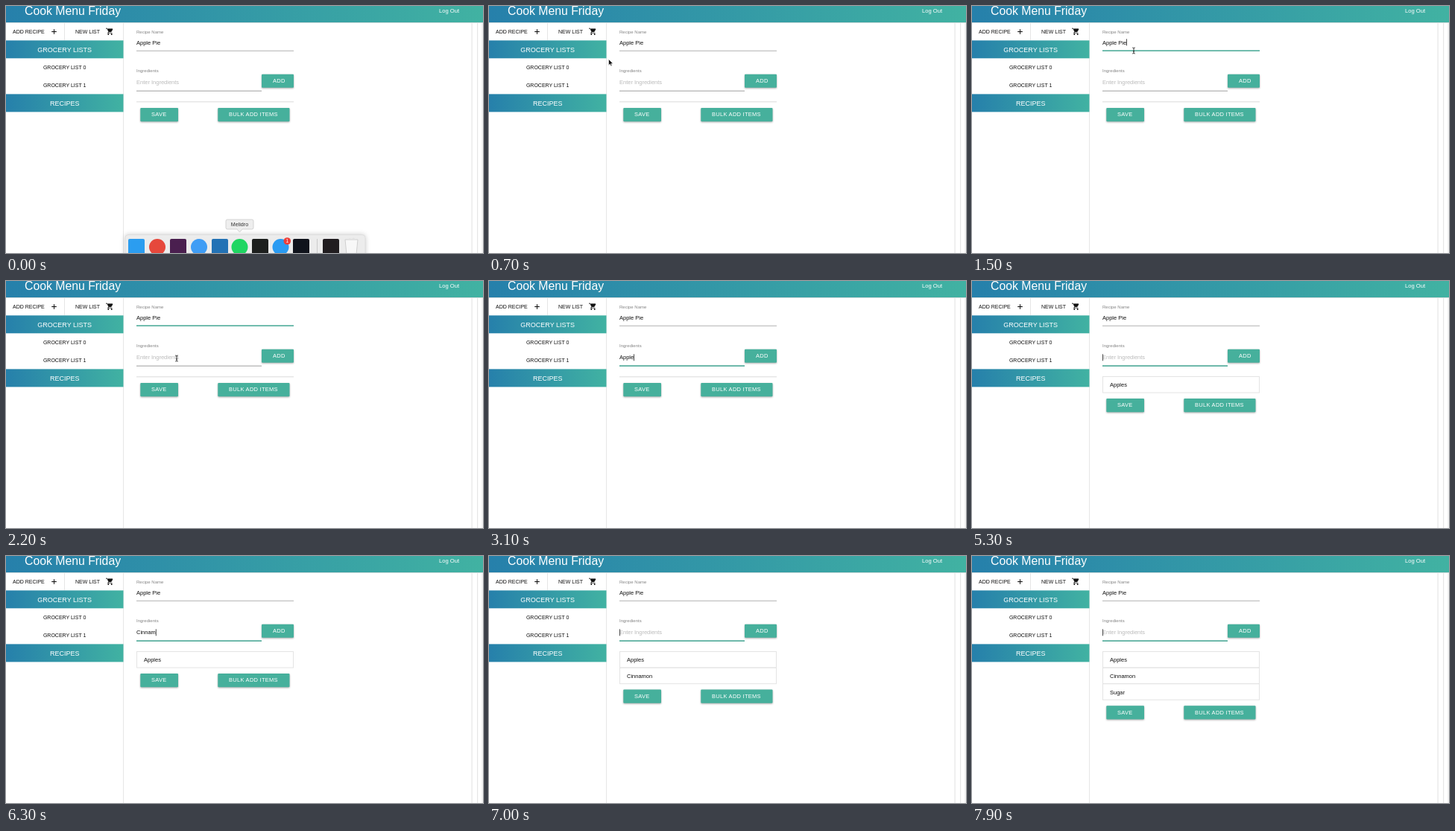
These frames come from a looping animation (640x332 px, 8 s). An HTML page:

```html
<!DOCTYPE html>
<html lang="en">
<head>
<meta charset="utf-8">
<title>Recipe form</title>
<style>
html, body { margin: 0; width: 100%; height: 100%; overflow: hidden; background: #fff; }
svg { display: block; width: 100vw; height: 100vh; }
text { font: 7.5px "Liberation Sans", Arial, sans-serif; fill: #111; white-space: pre; }
.title { font-size: 15.8px; fill: #fff; }
.logout { font-size: 7.6px; fill: #fff; }
.menu { font-size: 7px; }
.bar { font-size: 9px; fill: #fff; }
.mid { text-anchor: middle; }
.label { font-size: 6px; fill: #858585; }
.hint { fill: #bababa; }
.button rect { fill: #46b09c; filter: drop-shadow(0 1px .8px #0005); }
.button text { fill: #fff; letter-spacing: .27px; }
.focus { fill: #45ae9a; transform-box: fill-box; transform-origin: center; }
.rows rect { fill: none; stroke: #e4e4e4; }
</style>
</head>
<body>
<svg viewBox="0 0 640 332" preserveAspectRatio="none">
  <defs>
    <linearGradient id="sea"><stop stop-color="#2680ab"/><stop offset="1" stop-color="#41b2a2"/></linearGradient>
  </defs>
  <rect width="640" height="332" fill="#fff"/>

  <g fill="#e6e6e6">
    <rect x="157" y="22" width="1" height="310"/>
    <rect x="78" y="23" width="1" height="23"/>
    <rect x="624.5" y="22" width="1.2" height="310"/>
    <rect x="632" y="22" width="1.2" height="310"/>
    <rect x="638.5" y="22" width="1" height="310"/>
  </g>
  <rect y="22" width="640" height="1" fill="#d5dcdc"/>
  <rect width="640" height="22" fill="url(#sea)"/>
  <text class="title" x="25" y="12">Cook Menu Friday</text>
  <text class="logout" x="581" y="9">Log Out</text>

  <text class="menu" x="9" y="37">ADD RECIPE</text>
  <path d="M61.2 34.5h6.6M64.5 31.2v6.6" stroke="#111"/>
  <text class="menu" x="93" y="37">NEW LIST</text>
  <g fill="#111">
    <path d="M134 30.2h1.8l2 4.2h3.4l1.8-3.4h-6" fill="none" stroke="#111" stroke-width=".9"/>
    <path d="M136 30.8h7l-1.9 3.6h-3.4zM135.9 36.4l1.6-2 .6.5-.5.8h4.8v.9h-6.5z"/>
    <circle cx="137.3" cy="38" r="1"/><circle cx="141.7" cy="38" r="1"/>
  </g>
  <rect y="46.3" width="157.5" height="24" fill="url(#sea)"/>
  <text class="bar mid" x="78.7" y="61.7">GROCERY LISTS</text>
  <text class="menu mid" x="78.7" y="85">GROCERY LIST 0</text>
  <text class="menu mid" x="78.7" y="109">GROCERY LIST 1</text>
  <rect y="118.4" width="157.5" height="24" fill="url(#sea)"/>
  <text class="bar mid" x="78.7" y="133.6">RECIPES</text>

  <text class="label" x="175" y="37.2">Recipe Name</text>
  <text id="recipe" x="175" y="51.5">Apple Pie</text>
  <rect x="175" y="59.8" width="211" height=".9" fill="#a8a8a8"/>
  <rect id="recipeFocus" class="focus" x="175" y="59.4" width="211" height="1.4"/>

  <text class="label" x="175" y="88.6">Ingredients</text>
  <text id="hint" class="hint" x="175" y="105.4">Enter Ingredients</text>
  <text id="entry" x="175" y="105.4"></text>
  <rect x="175" y="113.7" width="168" height=".9" fill="#949494"/>
  <rect id="entryFocus" class="focus" x="175" y="113.4" width="168" height="1.4"/>
  <rect id="caret" width=".8" height="9" fill="#222"/>

  <g class="button"><rect x="343" y="91.7" width="43" height="18" rx="1"/><text x="358" y="103.1">ADD</text></g>

  <rect id="emptyList" x="175" y="128.4" width="211" height=".9" fill="#d6d6d6"/>
  <g class="rows" id="rows"></g>
  <g id="actions">
    <g class="button"><rect x="180.3" y="137" width="50.7" height="18.2" rx="1"/><text x="195" y="148.4">SAVE</text></g>
    <g class="button"><rect x="284.3" y="137" width="96.2" height="18.2" rx="1"/><text x="299" y="148.4">BULK ADD ITEMS</text></g>
  </g>

  <g id="dock">
    <rect x="160" y="307.5" width="322" height="40" rx="4" fill="#ececec" stroke="#dedede" style="filter:drop-shadow(0 0 3px #0003)"/>
    <g id="icons"></g>
    <rect x="417" y="313" width=".8" height="20" fill="#c4c4c4"/>
    <path d="M455 314h17l-2 20h-13z" fill="#f8f8f8" stroke="#cfcfcf"/>
    <path d="M458 314l2.5-2 3 1 3-1.5 3 2.5z" fill="#e2e2e2"/>
    <circle cx="377.3" cy="316" r="4.8" fill="#ee3e39"/>
    <text class="mid" x="377.3" y="318.3" style="font-size:6.5px;fill:#fff">1</text>
  </g>
  <g id="tip">
    <path d="M297 287h33q2 0 2 2v9q0 2-2 2h-13l-3.5 4-3.5-4h-13q-2 0-2-2v-9q0-2 2-2z" fill="#eeeeee" stroke="#cbcbcb" stroke-width=".8"/>
    <text class="mid" x="313.5" y="296.2" style="font-size:7.1px;fill:#333">Melidro</text>
  </g>

  <g id="pointer">
    <path id="arrow" d="M0 0v8.2l1.9-1.7 1.2 2.8 1.4-.6-1.2-2.7h2.6z" fill="#111" stroke="#fff" stroke-width=".6"/>
    <path id="beam" d="M-1.8-4q1.8 0 1.8 1v6q0 1-1.8 1M1.8-4Q0-4 0-3M1.8 4Q0 4 0 3M-1 1h2" fill="none" stroke="#222" stroke-width=".9"/>
  </g>
</svg>
<script>
const LOOP = 8000, ROW = 21.6, BLINK = 500;
const $ = id => document.getElementById(id);
const clamp = v => Math.min(1, Math.max(0, v));
const ease = v => v * v * (3 - 2 * v);
const progress = (t, from, length) => ease(clamp((t - from) / length));
const show = (el, on) => el.setAttribute('visibility', on ? 'visible' : 'hidden');

const RECIPE_CLICK = 1350, ENTRY_CLICK = 2250, HIDE_POINTER = 2700;
const words = [
  { text: 'Apples', start: 2700, step: 95, added: 3900 },
  { text: 'Cinnamon', start: 5450, step: 150, added: 7000 },
  { text: 'Sugar', start: 7200, step: 110, added: 7900 }
];
const path = [
  [100, 313, 332], [400, 236, 190], [700, 160.5, 71.5], [900, 163, 67],
  [1300, 217, 60], [1900, 217, 60], [2200, 229, 104], [2700, 229, 104]
];
const icons = [
  [175, '#2b9df0'], [203, '#e6483c', 1], [231, '#4a1f4f'], [259, '#3f9df5', 1],
  [287, '#2372b5'], [313.5, '#1fd662', 1], [341, '#1d1f1e'], [368.5, '#2a9bf2', 1],
  [396, '#10131c'], [436, '#211d20']
];

$('icons').innerHTML = icons.map(([x, fill, round]) =>
  `<rect x="${x - 11}" y="313" width="22" height="22" rx="${round ? 11 : 2}" fill="${fill}"/>`).join('');
$('rows').innerHTML = words.map(({ text }, i) => {
  const y = 128.5 + i * ROW;
  return `<g><rect x="175.5" y="${y}" width="210" height="${ROW}"/><text x="185" y="${y + 13.8}">${text}</text></g>`;
}).join('');
const rows = [...$('rows').children];

function pointerAt(t) {
  const next = path.findIndex(p => p[0] > t);
  if (next < 1) return path[next ? path.length - 1 : 0].slice(1);
  const [t0, x0, y0] = path[next - 1], [t1, x1, y1] = path[next];
  const k = ease((t - t0) / (t1 - t0));
  return [x0 + (x1 - x0) * k, y0 + (y1 - y0) * k];
}

function drawPointer(t) {
  const [x, y] = pointerAt(t);
  const visible = t >= 100 && t < HIDE_POINTER;
  const overField = x > 175 && ((y > 42 && y < 62) || (x < 343 && y > 94 && y < 115));
  $('pointer').setAttribute('transform', `translate(${x} ${y})`);
  show($('arrow'), visible && !overField);
  show($('beam'), visible && overField);
}

function drawForm(t) {
  const typing = words.find(w => t >= w.start && t < w.added);
  const letters = typing ? Math.min(typing.text.length, 1 + Math.floor((t - typing.start) / typing.step)) : 0;
  $('entry').textContent = typing ? typing.text.slice(0, letters) : '';
  show($('hint'), !typing);

  const recipeLine = progress(t, RECIPE_CLICK, 150) - progress(t, ENTRY_CLICK, 150);
  $('recipeFocus').style.transform = `scaleX(${recipeLine})`;
  $('entryFocus').style.transform = `scaleX(${progress(t, ENTRY_CLICK, 150)})`;

  const count = words.filter(w => t >= w.added).length;
  rows.forEach((row, i) => show(row, i < count));
  show($('emptyList'), !count);
  $('actions').setAttribute('transform', `translate(0 ${count * ROW - (count ? .6 : 0)})`);

  // The caret turns solid again after each click, letter and added item.
  const inEntry = t >= ENTRY_CLICK;
  const resets = [RECIPE_CLICK, ENTRY_CLICK, ...words.map(w => w.added)].filter(r => r <= t);
  if (typing) resets.push(typing.start + (letters - 1) * typing.step);
  const field = $(inEntry ? 'entry' : 'recipe');
  const width = field.textContent ? field.getComputedTextLength() : 0;
  $('caret').setAttribute('x', 175 + width);
  $('caret').setAttribute('y', inEntry ? 98.3 : 44.3);
  show($('caret'), resets.length && Math.floor((t - Math.max(...resets)) / BLINK) % 2 === 0);
}

function draw(t) {
  $('dock').setAttribute('transform', `translate(0 ${progress(t, 100, 400) * 36})`);
  show($('dock'), t < 500);
  show($('tip'), t < 100);
  drawPointer(t);
  drawForm(t);
}

const began = performance.now();
function tick() {
  draw((performance.now() - began) % LOOP);
  requestAnimationFrame(tick);
}
tick();
</script>
</body>
</html>
```
